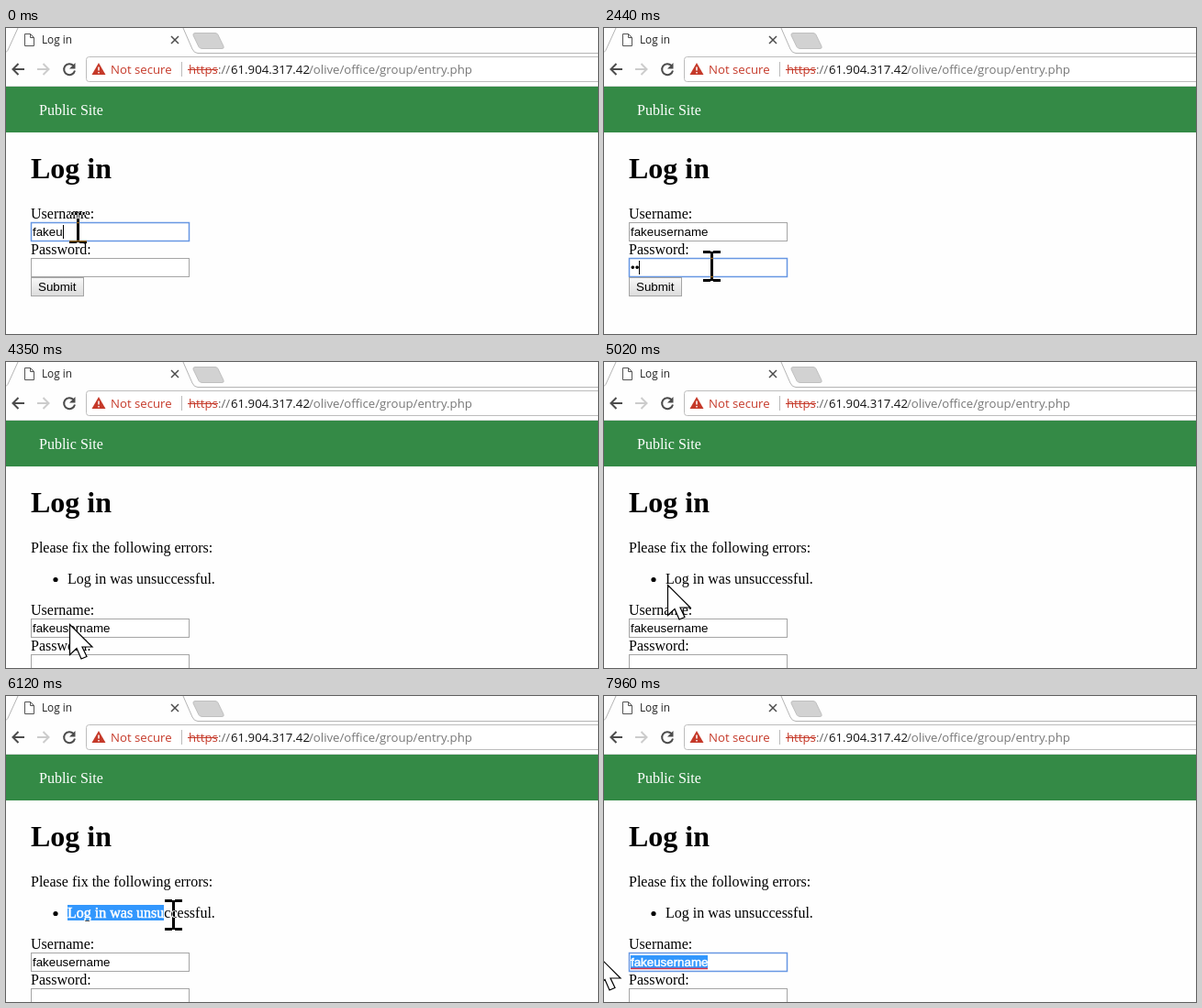
These frames come from a looping animation (645 px wide and 334 px high, 8 s). An HTML page:

```html
<!DOCTYPE html>
<html lang="en">
<head>
<meta charset="utf-8">
<title>Log in</title>
<style>
  html, body { margin: 0; width: 100%; height: 100%; overflow: hidden; background: #fff; }
  svg { display: block; width: 645px; height: 334px; }
  text { font: 16px "Liberation Serif", serif; white-space: pre; }
  .ui text { font: 13.2px "Open Sans", sans-serif; }
  .ui .tab { font-size: 11.8px; }
  .field { font: 13.33px "Liberation Sans", sans-serif; }
  .line { fill: none; stroke: #4c4c4c; stroke-width: 2; }
  .box { fill: #fff; stroke: #a5a5a5; }
  .box.focus { stroke: #6797e3; stroke-width: 1.5; }
  .selected rect { fill: #3297fd; }
  .selected text { fill: #fff; stroke: #fff; stroke-width: .5; }
  #beam { mix-blend-mode: difference; fill: #fff; }
</style>
</head>
<body>
<svg viewBox="0 0 645 334">
  <defs>
    <linearGradient id="face" x2="0" y2="1">
      <stop stop-color="#f8f8f8"/><stop offset="1" stop-color="#dcdcdc"/>
    </linearGradient>
    <clipPath id="messageClip"><rect id="messageRange" y="228" height="17"/></clipPath>
    <clipPath id="userClip"><rect id="userRange" y="215" height="15"/></clipPath>
  </defs>
  <rect width="645" height="334" fill="#fefefe"/>

  <g class="ui">
    <rect id="loadingShade" x="20" y="5" width="181" height="58" fill="#f2f2f2"/>
    <path d="M0 26.5Q2 25 3 22L13 0M193 0L203 23Q205 27.5 209 27.5H645" fill="none" stroke="#b4b4b4"/>
    <path d="M206 5.5H228Q230 5.5 231 7.5L237 20Q238 22.5 235 22.5H214Q211 22.5 210 20.5L204 8Q203.5 5.5 206 5.5Z" fill="#d2d2d2" stroke="#c0c0c0"/>
    <path id="page" d="M20.5 6.5H26.5L30.5 10.5V19.5H20.5ZM26.5 6.5V10.5H30.5" fill="#fff" stroke="#555"/>
    <text class="tab" x="39" y="17" fill="#222">Log in</text>
    <path class="line" style="stroke-width:1.5" d="M180 9L188 17M188 9L180 17"/>
    <path class="line" d="M20 45H8M13.5 39L7.5 45L13.5 51"/>
    <path class="line" style="stroke:#ccc" d="M34 45H46M40.5 39L46.5 45L40.5 51"/>
    <g id="reload">
      <path class="line" d="M73.5 41A6 6 0 1 0 75 46.5"/>
      <path d="M75.5 38V44.5H69Z" fill="#4c4c4c"/>
    </g>
    <path id="stop" class="line" d="M64 40L74 50M74 40L64 50"/>
    <rect x="87.5" y="31.5" width="570" height="27" rx="3" fill="#fff" stroke="#bdbdbd"/>
    <path d="M101 38L108.5 51H93.5Z" fill="#c53929"/>
    <path d="M101 42.5V46.5M101 48V49.5" stroke="#fff" stroke-width="1.5"/>
    <text x="114" y="50" fill="#c53929">Not secure</text>
    <path d="M191.5 37V53" stroke="#bbb"/>
    <text x="199" y="50" fill="#c53929">https</text>
    <path d="M198 45.5H231" stroke="#c53929"/>
    <text x="231" y="50" fill="#666">://</text>
    <text x="245" y="50" fill="#111">61.904.317.42</text>
    <text x="330" y="50" fill="#777">/olive/office/group/entry.php</text>
    <path d="M0 63.5H645" stroke="#ddd"/>
  </g>

  <rect y="64" width="645" height="50" fill="#348a46"/>
  <text x="36" y="95" fill="#fff">Public Site</text>
  <text x="27" y="164" style="font-size:32px;font-weight:bold">Log in</text>

  <g id="errors">
    <text x="27" y="208">Please fix the following errors:</text>
    <circle cx="54" cy="237.5" r="2.6"/>
    <text x="67" y="242">Log in was unsuccessful.</text>
    <g class="selected" clip-path="url(#messageClip)">
      <rect x="60" y="228" width="175" height="18"/>
      <text x="67" y="242">Log in was unsuccessful.</text>
    </g>
  </g>

  <g id="form">
    <text x="27" y="208">Username:</text>
    <rect id="userBox" class="box" x="27.5" y="212.5" width="172" height="20"/>
    <text id="user" class="field" x="29" y="227"></text>
    <g class="selected" clip-path="url(#userClip)">
      <rect x="29" y="215" width="90" height="15"/>
      <text class="field" x="29" y="227">fakeusername</text>
    </g>
    <path id="spelling" d="M29 229.5H113" stroke="#d3304a" stroke-width="1.5"/>
    <text x="27" y="247">Password:</text>
    <rect id="passBox" class="box" x="27.5" y="251.5" width="172" height="20"/>
    <text id="pass" class="field" x="29" y="266"></text>
    <rect id="caret" width="1" height="15"/>
    <rect id="button" x="27.5" y="272.5" width="57" height="20" fill="url(#face)"/>
    <text class="field" x="35" y="287">Submit</text>
  </g>

  <path id="beam" d="M-9-17H-1V-16H2V-17H10V-14H2V14H10V17H2V16H-1V17H-9V14H-1V-14H-9Z"/>
  <path id="arrow" d="M.5.5V33.5L8 26.5L13 38L19 35.5L14 25H25Z" fill="#fff" stroke="#000" stroke-width="1.2"/>
</svg>
<script>
const LOOP = 8000;
const el = Object.fromEntries([...document.querySelectorAll("[id]")].map(e => [e.id, e]));

// Each entry: start time, then the values held until the next entry.
const typed = [[0, 5], [130, 6], [264, 7], [398, 8], [532, 9], [666, 11], [800, 12]];
const dots = [[0, 0], [2440, 2], [2590, 5], [2710, 8], [2840, 11], [2970, 14], [3104, 16], [4070, 0]];
const pointer = [
  [0, "beam", 78, 218], [1480, "beam", 78, 229], [1780, "beam", 104, 244], [1905, "beam", 117, 260],
  [3104, "beam", 105, 262], [3237, "arrow", 82, 290], [3370, "arrow", 69, 286],
  [4360, "arrow", 69, 268], [4500, "arrow", 69, 250], [4620, "arrow", 48, 249], [4760, "arrow", 28, 247],
  [4890, "arrow", 55, 245], [5020, "arrow", 69, 243], [5270, "beam", 110, 245], [5410, "beam", 180, 245],
  [5550, "beam", 222, 245], [5690, "beam", 140, 243], [5830, "beam", 67, 239], [5980, "beam", 125, 239],
  [6120, "beam", 182, 239], [6250, "beam", 222, 241], [6390, "beam", 210, 265], [6530, "beam", 196, 290],
  [6670, "beam", 190, 248], [6970, "beam", 180, 270], [7110, "beam", 160, 288], [7250, "beam", 146, 293],
  [7400, "beam", 114, 293], [7540, "beam", 78, 293], [7680, "beam", 30, 292],
  [7820, "arrow", 8, 285], [7960, "arrow", -7, 283]
];
const messageEnd = [[0, 67], [5980, 118], [6120, 172], [6250, 228], [6390, 67]];
const userStart = [[0, 113], [7540, 78], [7680, 29]];

const at = (track, t) => track.findLast(step => step[0] <= t).slice(1);
const within = (t, from, to) => t >= from && t < to;
const show = (node, on) => node.setAttribute("visibility", on ? "visible" : "hidden");
const set = (node, attrs) => {
  for (const name in attrs) node.setAttribute(name, attrs[name]);
};

function render(t) {
  const failed = t >= 4070;
  const loading = within(t, 3650, 4210);
  const userFocus = t < 2030 || t >= 7400;
  const passFocus = within(t, 2030, 3510);

  show(el.page, !loading);
  show(el.reload, !loading);
  show(el.stop, loading);
  show(el.loadingShade, loading);
  show(el.errors, failed);
  set(el.form, { transform: `translate(0 ${failed ? 68 : 0})` });

  el.user.textContent = "fakeusername".slice(0, at(typed, t)[0]);
  el.pass.textContent = "•".repeat(at(dots, t)[0]);
  el.userBox.classList.toggle("focus", userFocus);
  el.passBox.classList.toggle("focus", passFocus);
  set(el.button, { stroke: within(t, 3510, 4070) ? "#666" : "#a5a5a5" });

  const active = passFocus ? el.pass : el.user;
  set(el.caret, { x: Math.round(29 + active.getComputedTextLength()), y: passFocus ? 254 : 215 });
  show(el.caret, passFocus || userFocus && !within(t, 1350, 1880) && t < 7540);

  set(el.messageRange, { x: 67, width: at(messageEnd, t)[0] - 67 });
  const start = at(userStart, t)[0];
  set(el.userRange, { x: start, width: 113 - start });
  show(el.spelling, t >= 7400);

  const [kind, x, y] = at(pointer, t);
  for (const name of ["beam", "arrow"]) show(el[name], name === kind);
  set(el[kind], { transform: `translate(${x} ${y})` });
}

function tick() {
  render(performance.now() % LOOP);
  requestAnimationFrame(tick);
}
tick();
</script>
</body>
</html>
```
